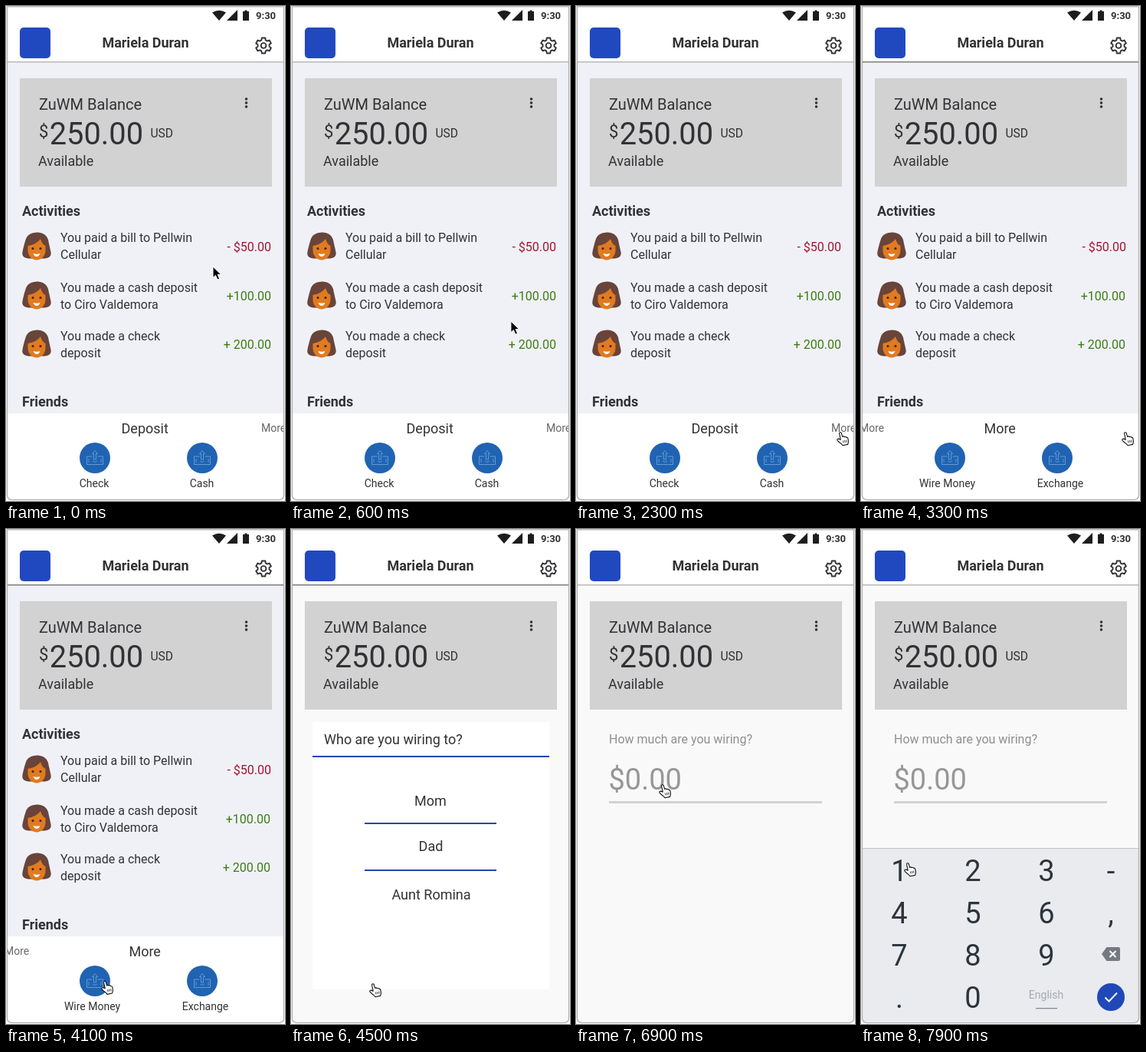
These frames come from a looping animation (364 px wide and 644 px high, 8000 ms). An HTML page:

```html
<!DOCTYPE html>
<html lang="en">
<head>
<meta charset="utf-8">
<title>Wallet app</title>
<style>
  html, body { margin: 0; width: 100%; height: 100%; overflow: hidden; background: #fff; }
  svg { display: block; width: 364px; height: 644px; font-family: Roboto, Arial, sans-serif; }
</style>
</head>
<body>
<svg id="stage" viewBox="0 0 364 644"></svg>
<script>
const INK = '#323236', BLUE = '#2348ae', GREEN = '#3d7d12', RED = '#a9122f';
const LOOP = 8000, STEP = 100;

const rect = (x, y, w, h, fill, extra = '') =>
  `<rect x="${x}" y="${y}" width="${w}" height="${h}" fill="${fill}" ${extra}/>`;

const text = (x, y, size, str, { fill = INK, anchor = 'start', weight = 400 } = {}) =>
  `<text x="${x}" y="${y}" font-size="${size}" fill="${fill}" text-anchor="${anchor}" font-weight="${weight}">${str}</text>`;

const mid = (x, y, size, str, opts) => text(x, y, size, str, { anchor: 'middle', ...opts });
const end = (x, y, size, str, opts) => text(x, y, size, str, { anchor: 'end', ...opts });
const group = (id, body) => `<g id="${id}" opacity="0">${body}</g>`;

function gear(cx, cy) {
  const pts = [];
  for (let i = 0; i < 6; i++) {
    for (const [off, r] of [[-0.36, 7.6], [-0.22, 10.3], [0.22, 10.3], [0.36, 7.6]]) {
      const a = i * Math.PI / 3 + off;
      pts.push((cx + r * Math.sin(a)).toFixed(2) + ',' + (cy - r * Math.cos(a)).toFixed(2));
    }
  }
  return `<g fill="none" stroke="${INK}" stroke-width="1.9" stroke-linejoin="round">
    <polygon points="${pts.join(' ')}"/><circle cx="${cx}" cy="${cy}" r="3.4"/></g>`;
}

const avatar = (x, y) => `<g transform="translate(${x} ${y})">
  <path d="M-1-18.3C7-19 13-15 15-9C16-4 17 0 18.5 7C19.5 12 17 14.5 11 15.5H-11C-17 14.5-19.5 12-18.5 7C-17 0-16-4-14-10C-12-15-8-18-1-18.3Z" fill="#69443a"/>
  <path d="M-11.5-1Q0-3 5-10Q7-3 11.5-1V5C11.5 12 6 17.5 0 17.5S-11.5 12-11.5 5Z" fill="#e27a1f"/>
  <circle cx="-5" cy="2.5" r="1.5" fill="#3a2420"/><circle cx="5" cy="2.5" r="1.5" fill="#3a2420"/>
  <path d="M-4.5 9Q0 10.5 4.5 9Q3 13 0 13T-4.5 9Z" fill="#fff"/></g>`;

const action = (x, labelX, label) => `<g transform="translate(${x} 588)">
  <circle r="20" fill="#2063b3"/>
  <g fill="none" stroke="#6fa9d8" stroke-width=".8" stroke-linejoin="round">
    <path d="M-3.5-2H-10.5V8.5H10.5V-2H3.5M-8 1V6M8 1V6M-3 4Q0 7 3 4"/>
    <path d="M-1.5 2V-5.5H-3.5L0-9.5L3.5-5.5H1.5V2Z"/></g></g>` + mid(labelX, 626, 14, label);

const line = dark => rect(2, 72, 360, 1.6, dark ? '#858585' : '#bdbdbd');

function home(amountX, title, actions, side, dark) {
  const rows = [
    [313, 307, 'You paid a bill to Pellwin', 'Cellular', '- $50.00', RED, 346],
    [377, 372, 'You made a cash deposit', 'to Ciro Valdemora', '+100.00', GREEN, amountX],
    [440, 435, 'You made a check', 'deposit', '+ 200.00', GREEN, amountX]
  ];
  return rect(2, 73, 360, 457, '#f0f1f7') + line(dark) + card +
    text(21, 273, 18, 'Activities', { weight: 700 }) +
    rows.map(([cy, y, a, b, sum, fill, x]) => avatar(40, cy) + text(71, y, 16, a) +
      text(71, y + 22, 16, b) + end(x, cy + 6, 16, sum, { fill })).join('') +
    text(21, 521, 18, 'Friends', { weight: 700 }) +
    rect(2, 530, 360, 111, '#fff') + mid(181.2, 556, 18, title) +
    text(side, 554, 14, 'More', { fill: '#68686c' }) + actions;
}

const card = rect(18, 94, 329, 141, '#d2d2d2') +
  text(43, 135, 20, 'ZuWM Balance') + text(43, 171, 22, '$') +
  text(56.7, 180, 39.8, '250.00') + text(188.4, 171, 15.6, 'USD') + text(42, 208, 18, 'Available') +
  [121, 126, 131].map(y => `<circle cx="313.5" cy="${y}" r="1.8" fill="${INK}"/>`).join('');

const plain = dark => rect(2, 73, 360, 568, '#f9f9f9') + line(dark) + card;

const header = rect(2, 1, 360, 71, '#fff') +
  `<g fill="#1d1d20"><path d="M278 19L269 8.5Q278 3 287 8.5Z"/><path d="M288 19H302V5Z"/>
   <path d="M309 7H311.5V5.5H314.5V7H317V19H309Z"/></g>` +
  text(326, 17, 13, '9:30', { weight: 700 }) +
  rect(18, 28, 40, 40, '#2149bf', 'rx="5"') +
  mid(182, 54, 18, 'Mariela Duran', { weight: 700 }) + gear(336, 51.5);

const people = plain(true) + rect(28, 251, 309, 348, '#fff') +
  text(43, 280, 18, 'Who are you wiring to?') + rect(28, 295, 309, 2, BLUE) +
  mid(182, 360, 18, 'Mom') + rect(96, 382, 172, 2, BLUE) +
  mid(182.5, 419, 18, 'Dad') + rect(96, 443, 172, 2, BLUE) +
  mid(183, 482, 18, 'Aunt Romina');

const amount = plain(false) +
  text(43, 279, 16, 'How much are you wiring?', { fill: '#8f8f8f' }) +
  text(42.5, 339.3, 38, '$0.00', { fill: '#979797' }) + rect(43, 354, 278, 3, '#d2d2d2');

const key = (x, y, s) => mid(x, y, 38, s, { fill: '#2c343c' });
const keypad = rect(2, 415, 360, 226, '#e9ebef') + rect(2, 415, 360, 1, '#bfc1c5') +
  ['123-', '456,', '789', '.0'].map((row, r) =>
    [...row].map((s, c) => key([50, 146, 242, 326][c], 457.5 + r * 55, s)).join('')).join('') +
  `<path d="M314 553L320.5 544H336Q338 544 338 546V560Q338 562 336 562H320.5Z" fill="#747a80"/>
   <path d="M324.5 549L332.5 557M332.5 549L324.5 557" stroke="#fff" stroke-width="2"/>` +
  mid(241.5, 611, 14, 'English', { fill: '#a6a9ae' }) + rect(228, 623, 28, 1.3, '#85898e') +
  `<circle cx="326" cy="609" r="18" fill="#2148b8"/>
   <path d="M318.5 609.5L323.5 614.5L334 603.5" fill="none" stroke="#fff" stroke-width="2"/>`;

const cursors = `<path id="arrow" d="M0 0V14.5L3.4 11.4L5.9 17L8.6 15.8L6.2 10.4H10.8Z" fill="#000" stroke="#fff" stroke-width="1"/>
  <g id="hand" fill="#fff" stroke="#111" stroke-width="1.1" stroke-linejoin="round">
  <path d="M3.6 2.4C3.2 .6 5.6 0 6.3 1.8L7.6 6.4Q9 5.2 10.2 6.6Q11.8 5.6 12.7 7.2Q14.4 6.8 14.9 8.8L15.4 12.4Q15.4 14.5 14.4 16.4L8 17.8Q6.4 15.4 4 14L1.2 11.4Q.2 9.8 1.6 9.2Q3.2 9 5.2 10.2Z"/>
  <path d="M8.4 11.4L9 14.4M10.5 11L11.1 14M12.6 10.6L13.1 13.6" stroke-width=".8"/></g>`;

const $ = id => document.getElementById(id);
$('stage').innerHTML = `<clipPath id="phone"><path d="M2 1H362V636Q362 642 356 642H8Q2 642 2 636Z"/></clipPath>
  <g clip-path="url(#phone)">` + header +
  home(346, 'Deposit', action(116, 115, 'Check') + action(256, 255.5, 'Cash'), 333, false) +
  group('more', home(345, 'More', action(116, 112.5, 'Wire Money') + action(256, 260, 'Exchange'), -2, true)) +
  group('people', people) + group('amount', amount) + group('keypad', keypad) + `</g>
  <path d="M1.5 .8H362.5V636Q362.5 642.3 356 642.3H8Q1.5 642.3 1.5 636Z" fill="none" stroke="#adadad" stroke-width="1.3"/>` + cursors;

// Dissolves: element, start, end
const fades = [['more', 2800, 3300], ['people', 4320, 4480], ['amount', 5780, 5920], ['keypad', 7050, 7300]];

// Pointer moves: start, end, destination
const moves = [
  [300, 1150, 329, 588], [1450, 2050, 340, 554], [3450, 4250, 102, 591],
  [4500, 5600, 186, 484], [6050, 6800, 108, 332], [7250, 7850, 56, 434]
];

const ramp = (t, a, b) => Math.min(1, Math.max(0, (t - a) / (b - a)));
const ease = p => p * p * (3 - 2 * p);

function draw(t) {
  for (const [id, a, b] of fades) $(id).setAttribute('opacity', ramp(t, a, b));
  let x = 270, y = 339;
  for (const [a, b, tx, ty] of moves) {
    const p = ease(ramp(t, a, b));
    x += (tx - x) * p;
    y += (ty - y) * p;
  }
  const overPanel = t > 1200 || y > 530;
  $('arrow').style.display = overPanel ? 'none' : '';
  $('hand').style.display = overPanel ? '' : 'none';
  for (const id of ['arrow', 'hand']) $(id).setAttribute('transform', `translate(${x.toFixed(1)} ${y.toFixed(1)})`);
}

const start = performance.now();
function tick() {
  const t = (performance.now() - start) % LOOP;
  draw(Math.floor(t / STEP) * STEP);
  requestAnimationFrame(tick);
}
tick();
</script>
</body>
</html>
```
